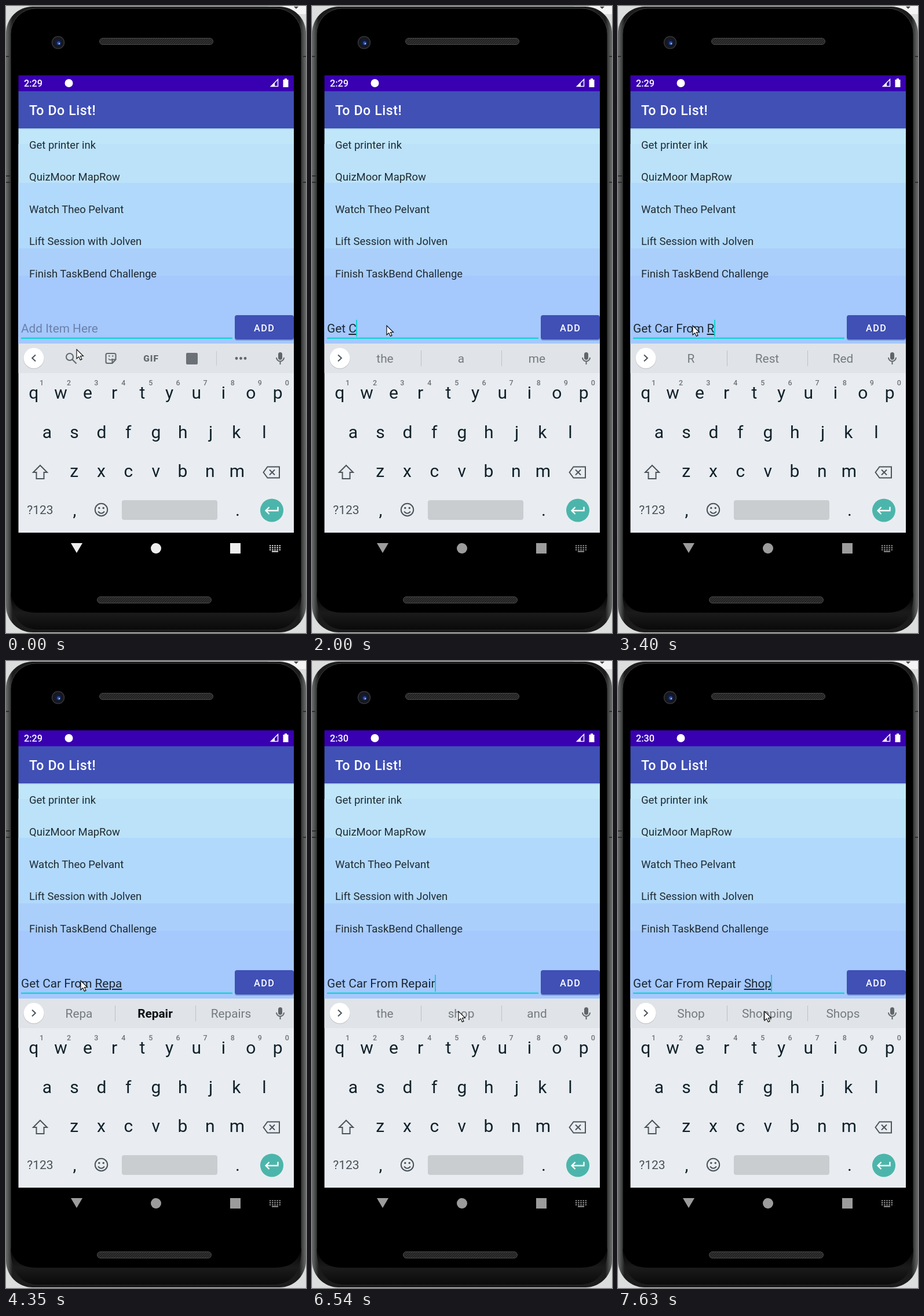
Animation of 518 by 1081 pixels, one loop 8 s. Source, as an HTML page:

```html
<!DOCTYPE html>
<html lang="en">
<head>
<meta charset="utf-8">
<title>To Do List</title>
<style>
  html, body { margin: 0; width: 100%; height: 100%; overflow: hidden; background: #000; }
  svg { display: block; width: 100%; height: 100%; }
  text { font-family: Roboto, sans-serif; white-space: pre; }
  .mid { text-anchor: middle; }
  .item { font-size: 18.48px; fill: #1f2a33; }
  .key { font-size: 30px; fill: #10212a; text-anchor: middle; }
  .digit { font-size: 12.5px; font-weight: 500; fill: #6c7378; text-anchor: middle; }
  .line { fill: none; stroke: #4b545b; stroke-width: 2; }
  .tool { fill: none; stroke: #62686d; stroke-width: 2.1; }
  .hint { font-size: 20.8px; fill: #747a7f; text-anchor: middle; }
  .hint.strong { font-weight: 700; fill: #0b0e10; }
  #field { font-size: 20.8px; fill: #1b2733; }
  #composing {
    text-decoration: underline; text-decoration-skip-ink: none;
    text-decoration-thickness: 1.2px; text-underline-offset: 2.2px;
  }
</style>
</head>
<body>
<svg viewBox="0 0 518 1081" preserveAspectRatio="none">
  <defs>
    <linearGradient id="shell">
      <stop offset="0" stop-color="#6b6c6c"/><stop offset=".01" stop-color="#4a4b4b"/>
      <stop offset=".022" stop-color="#1c1c1c"/><stop offset=".978" stop-color="#1c1c1c"/>
      <stop offset=".99" stop-color="#4a4b4b"/><stop offset="1" stop-color="#6b6c6c"/>
    </linearGradient>
    <linearGradient id="chin" x2="0" y2="1">
      <stop offset="0" stop-color="#000"/><stop offset=".55" stop-color="#1b1b1b"/><stop offset="1" stop-color="#0a0a0a"/>
    </linearGradient>
    <pattern id="mesh" width="4" height="4" patternUnits="userSpaceOnUse">
      <rect width="4" height="4" fill="#232323"/>
      <path d="M0 4 4 0" stroke="#3c3c3c"/>
    </pattern>
  </defs>

  <!-- phone -->
  <rect width="518" height="1081" fill="#dcdddd"/>
  <rect x="452" width="66" height="14" fill="#f4f4f4"/>
  <path d="M497 1h8l-4 4z" fill="#444"/>
  <rect x="0" y="1" width="518" height="1079" rx="46" fill="url(#shell)"/>
  <rect x="8" y="4" width="502" height="1052" rx="44" fill="#000" stroke="#3d3e3e"/>
  <path d="M8 1010Q12 1046 52 1046H464Q505 1046 510 1010Q511 1074 462 1075H55Q8 1074 8 1010Z" fill="url(#chin)"/>
  <path d="M0 87h5M0 293h7M0 304h7M513 87h5M513 304h5" stroke="#202020" stroke-width="1.500"/>
  <g fill="url(#mesh)" stroke="#4a4a4a" stroke-width="1">
    <rect x="161.500" y="55.500" width="196" height="11" rx="5.500"/>
    <rect x="157.500" y="1018.500" width="197" height="11" rx="5.500"/>
  </g>
  <circle cx="90" cy="63" r="10.500" fill="#17181d" stroke="#33343a" stroke-width="1.500"/>
  <circle cx="90" cy="63" r="5.500" fill="#101b42"/>
  <circle cx="91" cy="64" r="3" fill="#2b4d9e"/>
  <circle cx="92" cy="65" r="1.300" fill="#9fc0f0"/>

  <!-- app -->
  <rect x="21.500" y="119.500" width="475.500" height="28" fill="#3900b1"/>
  <text id="clock" x="31" y="139" font-size="16.200" font-weight="500" fill="#fff"></text>
  <circle cx="108.500" cy="133" r="7" fill="#fff"/>
  <path d="M457.500 138.500 469.500 126.500V138.500Z" fill="none" stroke="#fff" stroke-width="1.500"/>
  <path d="M457 139 464 132V139Z" fill="#fff"/>
  <path d="M481 125h4v2h2.500v13h-9v-13h2.500z" fill="#fff"/>
  <g id="bands"></g>
  <rect x="21.500" y="147" width="475.500" height="64" fill="#4050b5"/>
  <rect x="21.500" y="211" width="475.500" height="2" fill="#7f9ed0" opacity=".25"/>
  <text x="40" y="188" font-size="23.100" font-weight="500" letter-spacing=".6" fill="#fff">To Do List!</text>
  <g id="items"></g>

  <text id="placeholder" x="26" y="563" font-size="20.800" fill="#6b80aa">Add Item Here</text>
  <text id="field" x="26" y="563"><tspan id="done"></tspan><tspan id="composing"></tspan></text>
  <rect x="26" y="571.500" width="365" height="2.500" fill="#1bd2d6"/>
  <rect id="caret" y="541" width="2" height="29" fill="#12d4d0"/>
  <rect x="395" y="535" width="102" height="42" rx="4" fill="#20386f" opacity=".28"/>
  <rect x="395" y="533" width="102" height="42" rx="4" fill="#4050b5"/>
  <text x="428" y="560.500" font-size="16.200" font-weight="500" letter-spacing="1.440" fill="#fff">ADD</text>

  <!-- keyboard -->
  <rect x="21.500" y="582" width="475.500" height="326" fill="#e9edf1"/>
  <rect x="21.500" y="582" width="475.500" height="51" fill="#e0e4e8"/>
  <circle cx="48" cy="608" r="18" fill="#c9cdd1"/>
  <circle cx="48" cy="607" r="17.500" fill="#fff"/>
  <path id="chevron" class="line"/>
  <g fill="#5f656a">
    <rect x="470" y="597" width="7" height="13" rx="3.500"/>
    <path d="M467 606a6.500 6.500 0 0 0 13 0M473.500 612.500V618" fill="none" stroke="#5f656a" stroke-width="1.900"/>
  </g>

  <g id="tools">
    <g class="tool">
      <circle cx="110" cy="605" r="6"/><path d="m114.500 609.500 7 7"/>
      <path d="M175 599h12q2.500 0 2.500 2.500v8l-6 6.500h-8.500q-2.500 0-2.500-2.500v-12q0-2.500 2.500-2.500zM189.500 609.500h-4q-2 0-2 2v4.500"/>
      <path d="M177 608q3.500 4.500 7 0" stroke-width="1.600"/>
    </g>
    <path d="M177 603.500h2.500M183 603.500h2.500" stroke="#62686d" stroke-width="2.200"/>
    <text class="mid" x="250.500" y="613" font-size="15.500" font-weight="900" letter-spacing="1" fill="#62686d">GIF</text>
    <rect x="311" y="598" width="20" height="20" rx="2" fill="#6b7176"/>
    <path d="M363.500 595v25" stroke="#c3c8cc"/>
    <g fill="#62686d"><circle cx="398" cy="607.500" r="2.400"/><circle cx="405.500" cy="607.500" r="2.400"/><circle cx="413" cy="607.500" r="2.400"/></g>
  </g>
  <g id="hints">
    <path d="M188.500 594v27M327.500 594v27" stroke="#bcc1c5"/>
    <text class="hint" x="126" y="615"></text>
    <text class="hint" x="257.500" y="615"></text>
    <text class="hint" x="388.500" y="615"></text>
  </g>

  <g id="keys"></g>
  <path class="line" d="M59 792 71 804H65.500V815H52.500V804H47Z"/>
  <path class="line" d="M444.500 804 451.500 794.500H472V813.500H451.500ZM455 799.500l9 9M464 799.500l-9 9"/>
  <text class="mid" x="59" y="876" font-size="21" fill="#48525a">?123</text>
  <g class="line"><circle cx="164.500" cy="868.500" r="10.700"/><path d="M159 871.500q5.500 6.500 11 0"/></g>
  <g fill="#4b545b"><circle cx="160.800" cy="865.500" r="1.700"/><circle cx="168.200" cy="865.500" r="1.700"/></g>
  <rect x="200" y="852" width="165" height="34" rx="4" fill="#c9cdd0"/>
  <circle cx="459" cy="869.500" r="20" fill="#4cb5ab"/>
  <path d="M469.500 863.500v6.500h-20M454.500 864l-6 6 6 6" fill="none" stroke="#fff" stroke-width="2.300"/>

  <!-- navigation -->
  <g id="nav">
    <path d="M112 926h20l-10 17z"/>
    <circle cx="259" cy="935" r="9"/>
    <rect x="387" y="926" width="18" height="18"/>
    <path d="M455 930.500h19M455 934h19M455 937.500h19" stroke-width="2" stroke-dasharray="2.300 1.870"/>
    <path d="M459 940.500h11" stroke-width="2"/>
  </g>

  <path id="mouse" d="M0 0V16L3.800 12.600 6.300 18.300 9 17.100 6.500 11.500H11.500Z" fill="#fff" stroke="#000" stroke-width="1.100"/>
</svg>
<script>
const LOOP = 8000;
const $ = id => document.getElementById(id);

function add(parent, tag, attrs, text = '') {
  const node = document.createElementNS('http://www.w3.org/2000/svg', tag);
  for (const name in attrs) node.setAttribute(name, attrs[name]);
  node.textContent = text;
  $(parent).append(node);
}

[[211, '#c0e7f9'], [238, '#bbe2f9'], [305, '#b1d9fb'], [418, '#abcffb'], [465, '#a5c8fd']]
  .forEach(([y, fill]) => add('bands', 'rect', { x: 21.5, y, width: 475.5, height: 582 - y, fill }));

['Get printer ink', 'QuizMoor MapRow', 'Watch Theo Pelvant', 'Lift Session with Jolven', 'Finish TaskBend Challenge']
  .forEach((label, i) => add('items', 'text', { class: 'item', x: 40, y: 246 + 55.4 * i }, label));

// Key letters are centred on their ink rather than on their advance width.
const pen = document.createElement('canvas').getContext('2d');
pen.font = '30px Roboto, sans-serif';
pen.textAlign = 'center';
function addKey(c, x, y) {
  const ink = pen.measureText(c);
  const shift = (ink.actualBoundingBoxLeft - ink.actualBoundingBoxRight) / 2;
  add('keys', 'text', { class: 'key', x: x + shift, y }, c);
}
['qwertyuiop', 'asdfghjkl', 'zxcvbnm'].forEach((row, r) =>
  [...row].forEach((c, i) => addKey(c, 258.5 + 46.95 * (i - (row.length - 1) / 2), 677 + 67.5 * r)));
addKey(',', 118, 879);
addKey('.', 400, 879);
[...'1234567890'].forEach((c, i) => add('keys', 'text', { class: 'digit', x: 61.5 + 47.1 * i, y: 654 }, c));

// Typed text; the part after "|" is still being composed.
const typing = [
  [0, ''], [1150, '|G'], [1300, '|Ge'], [1420, '|Get'], [1540, 'Get '],
  [2000, 'Get |C'], [2150, 'Get |Ca'], [2270, 'Get |Car'], [2420, 'Get Car '],
  [2700, 'Get Car |F'], [2980, 'Get Car |Fr'], [3130, 'Get Car |From'], [3250, 'Get Car From '],
  [3400, 'Get Car From |R'], [3550, 'Get Car From |Re'], [3670, 'Get Car From |Rep'],
  [3820, 'Get Car From |Repa'], [6540, 'Get Car From Repair'], [6810, 'Get Car From Repair '],
  [6930, 'Get Car From Repair |S'], [7210, 'Get Car From Repair |Sh'],
  [7360, 'Get Car From Repair |Sho'], [7630, 'Get Car From Repair |Shop']
];
// Suggestions; "*" marks the bold one, an empty entry shows the toolbar.
const suggestions = [
  [0, ''], [1150, 'G,*Get,Good'], [1300, 'Ge,*Get,Getting'], [1420, 'Get,Gets,Getting'], [1540, 'the,a,me'],
  [2150, 'Ca,*Can,Cannot'], [2270, 'Car,Care,Career'], [2420, 'and,in,the'],
  [2700, 'F,*From,For'], [2980, 'Fr,*From,Fresh'], [3130, 'From,Front,Friend'], [3250, 'the,my,a'],
  [3400, 'R,Rest,Red'], [3550, 'Re,*Rest,Ready'], [3670, 'Rep,*Reply,Repo'], [3820, 'Repa,*Repair,Repairs'],
  [5090, ''], [5480, 'Repa,*Repair,Repairs'], [6540, 'the,shop,and'],
  [6930, 'S,So,See'], [7210, 'Sh,She,See'], [7360, 'Sho,Show,Should'],
  [7480, 'Sho,Show,Short'], [7630, 'Shop,Shopping,Shops']
];
const caretOn = [
  [0, 0], [240, 1], [780, 0], [1150, 1], [4350, 0], [4810, 1], [5910, 0], [6420, 1]
];
const mousePath = [
  [0, [122, 592]], [120, [125, 577]], [240, [127, 560]], [390, [129, 545]], [510, [130, 543]],
  [630, [129, 547]], [780, [129, 551]], [5910, [150, 562]], [6030, [195, 576]], [6150, [238, 591]],
  [6300, [249, 600]], [6420, [253, 604]]
];
const navShade = [0, 120, 240, 390, 510, 630, 780].map(t => [t, Math.round(238 - 82 * t / 780)]);

const at = (track, t) => track.findLast(([start]) => start <= t)[1];
const show = (id, on) => $(id).style.visibility = on ? 'visible' : 'hidden';
const hintNodes = document.querySelectorAll('.hint');

function render(t) {
  const typed = at(typing, t);
  const [done, composing = ''] = typed.split('|');
  $('done').textContent = done;
  $('composing').textContent = composing;
  show('placeholder', !typed);
  show('caret', at(caretOn, t));
  $('caret').setAttribute('x', Math.floor(26 + (typed ? $('field').getComputedTextLength() : 0)));

  const hints = at(suggestions, t);
  show('tools', !hints);
  show('hints', hints);
  $('chevron').setAttribute('d', hints ? 'M45 601.500l5.800 5.500-5.800 5.500' : 'M51 601.500l-5.800 5.500 5.800 5.500');
  const words = hints.split(',');
  hintNodes.forEach((node, i) => {
    const word = words[i] || '';
    node.textContent = word.replace('*', '');
    node.classList.toggle('strong', word[0] === '*');
  });

  $('clock').textContent = t < 5240 ? '2:29' : '2:30';
  const shade = at(navShade, t);
  const color = `rgb(${shade},${shade},${shade})`;
  $('nav').setAttribute('fill', color);
  $('nav').setAttribute('stroke', color);
  $('nav').setAttribute('stroke-width', 0);
  $('mouse').setAttribute('transform', `translate(${at(mousePath, t)})`);
}

const begin = performance.now();
function tick() {
  render((performance.now() - begin) % LOOP);
  requestAnimationFrame(tick);
}
tick();
</script>
</body>
</html>
```
